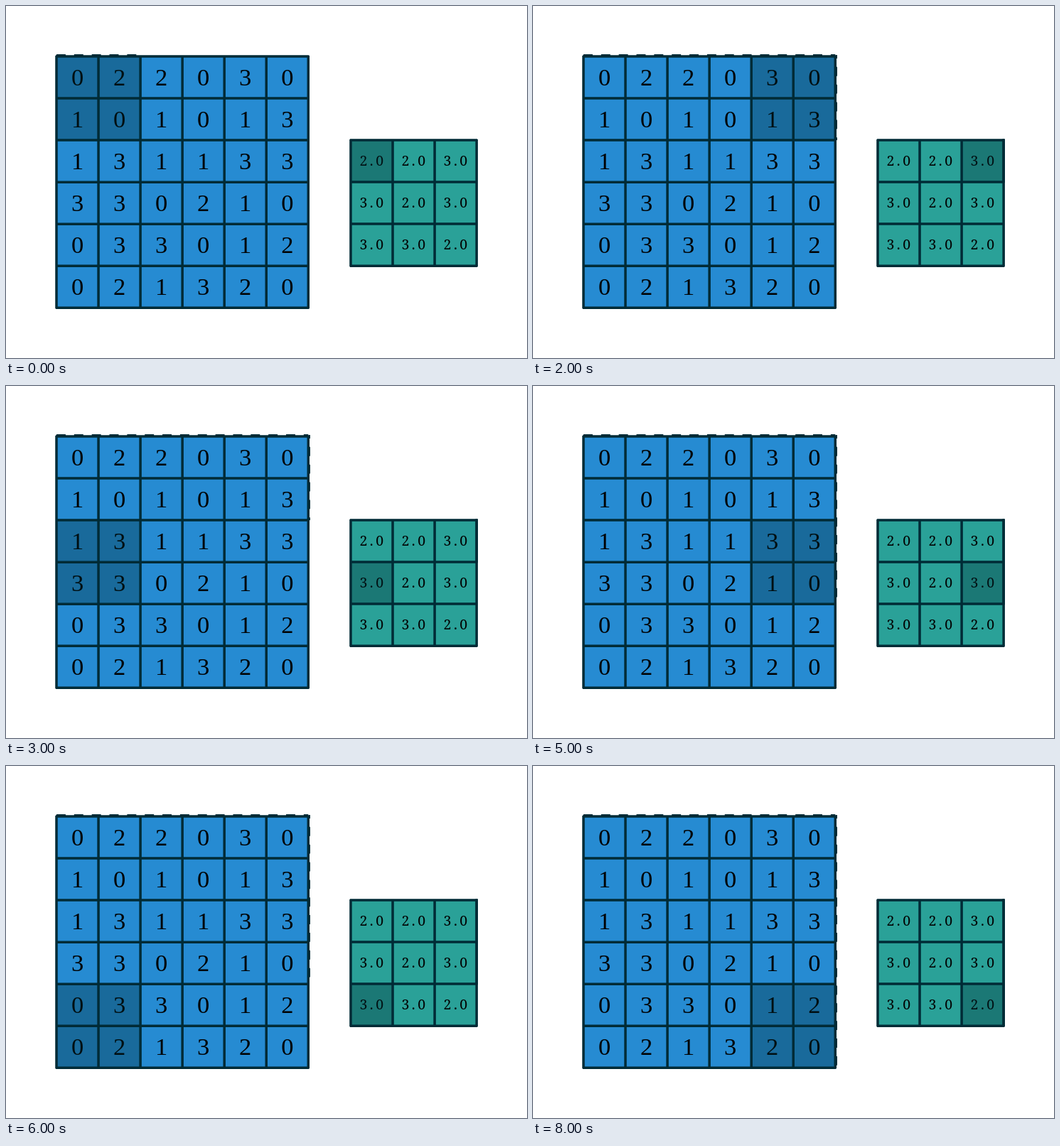
An HTML page that plays this animation: 733 by 496 pixels, repeating every 9000 ms.

```html
<!DOCTYPE html>
<html lang="en">
<head>
<meta charset="utf-8">
<title>Max pooling</title>
<style>
  html, body { margin: 0; width: 100%; height: 100%; overflow: hidden; background: #fff; }
  svg { display: block; }
  text { text-anchor: middle; }
  .big { font: 34.5px "Liberation Serif", serif; }
  .small { font: 19.5px "Noto Serif", serif; letter-spacing: 3.5px; }
  .line { fill: none; stroke: #002b36; stroke-width: 3.5; }
  .shade { fill: #002b36; fill-opacity: .35; }
</style>
</head>
<body>
<svg id="stage" width="733" height="496" viewBox="0 0 733 496"></svg>
<script>
const stage = document.getElementById('stage');
const CELL = 59.05, BLOCK = 2 * CELL;
const input = ['022030', '101013', '131133', '330210', '033012', '021320'];

function add(tag, attrs, content = '') {
  const el = document.createElementNS('http://www.w3.org/2000/svg', tag);
  for (const k in attrs) el.setAttribute(k, attrs[k]);
  el.textContent = content;
  return stage.appendChild(el);
}

// Adds a filled, numbered grid and returns its movable shade.
function grid(x, y, values, fill, shadeSize, font, dx, dy) {
  const n = values.length, size = n * CELL;
  add('rect', { x, y, width: size, height: size, fill });
  values.forEach((row, r) => [...row].forEach((v, c) =>
    add('text', { class: font, x: x + (c + .5) * CELL + dx, y: y + (r + .5) * CELL + dy }, v)));
  const shade = add('rect', { class: 'shade', x, y, width: shadeSize, height: shadeSize });
  let d = '';
  for (let i = 0; i <= n; i++) {
    const p = i * CELL;
    d += `M${x - 1} ${y + p}h${size + 2}M${x + p} ${y - 1}v${size + 2}`;
  }
  add('path', { class: 'line', d });
  return shade;
}

// Each output is the largest value of its 2 by 2 block.
const output = [0, 2, 4].map(r => [0, 2, 4].map(c =>
  Math.max(...input[r].slice(c, c + 2), ...input[r + 1].slice(c, c + 2)).toFixed(1)));

const block = grid(71, 71, input, '#268bd2', BLOCK, 'big', 0, 11.3);
const cell = grid(485, 189, output, '#2aa198', CELL, 'small', 1.5, 6.7);

// Outer edges that stay behind once the shade has passed them
const dashes = { class: 'line', 'stroke-dasharray': '12.9 11.95' };
const topEdge = add('path', dashes);
const sideEdge = add('path', { ...dashes, 'stroke-dashoffset': 8 });
const cellEdge = add('path', { class: 'line' });
topEdge.style.strokeWidth = sideEdge.style.strokeWidth = 2;

function draw(now) {
  const step = Math.floor(now / 1000) % 9;
  const col = step % 3, row = Math.floor(step / 3);
  const rows = Math.floor((step + 1) / 3);
  block.setAttribute('transform', `translate(${col * BLOCK} ${row * BLOCK})`);
  cell.setAttribute('transform', `translate(${col * CELL} ${row * CELL})`);
  topEdge.setAttribute('d', `M71 69H${71 + BLOCK * Math.min(step + 1, 3)}`);
  sideEdge.setAttribute('d', rows ? `M427 69V${71 + BLOCK * rows}` : '');
  cellEdge.setAttribute('d', rows ? `M662.2 187.3V${190 + CELL * rows}` : '');
  requestAnimationFrame(draw);
}
draw(performance.now());
</script>
</body>
</html>
```
